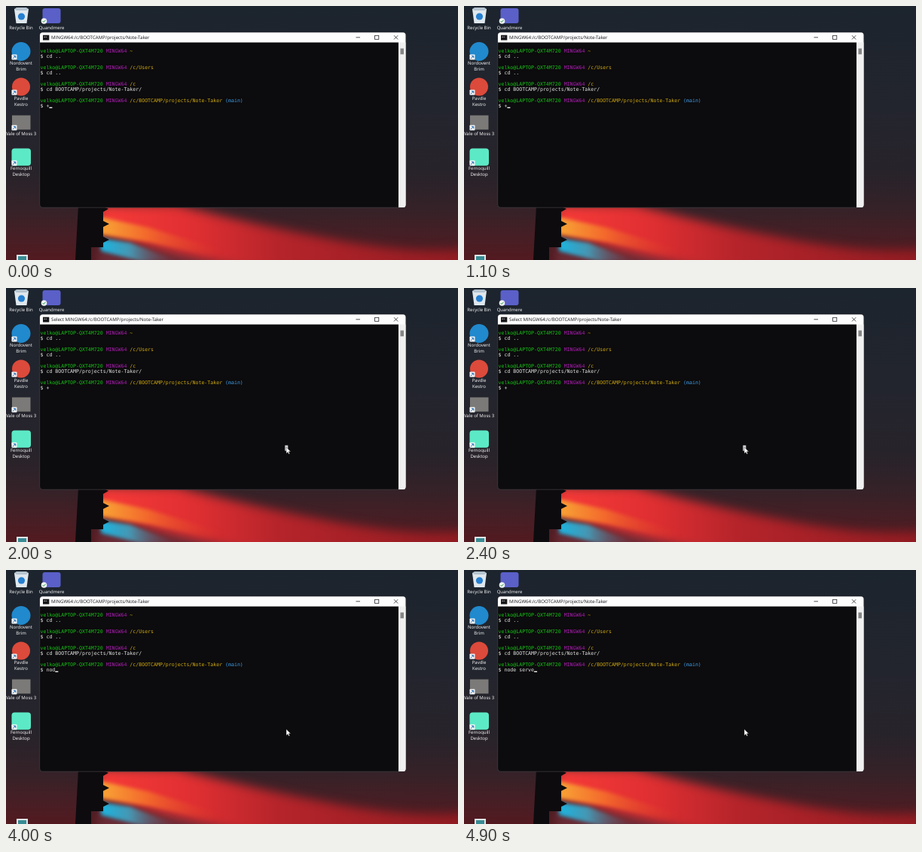
Animation, 600 px wide and 338 px high, one loop 5000 ms. Source, as an HTML page:

```html
<!DOCTYPE html>
<html lang="en">
<head>
<meta charset="utf-8">
<title>Terminal session</title>
<style>
html, body { margin: 0; width: 100%; height: 100%; overflow: hidden; background: #20252d; }
svg { display: block; width: 600px; height: 338px; }
text { text-rendering: geometricPrecision; white-space: pre; }
filter { color-interpolation-filters: sRGB; }
.label { font: 6px "Open Sans", sans-serif; fill: #fff; text-anchor: middle; }
.title { font: 6.17px "Open Sans", sans-serif; fill: #16161a; }
.term { font: 6.58px "DejaVu Sans Mono", monospace; fill: #e4e4e4; }
</style>
</head>
<body>
<svg viewBox="0 0 600 338" xmlns="http://www.w3.org/2000/svg">
  <defs>
    <linearGradient id="sky" x2="0" y2="1">
      <stop offset="0" stop-color="#1c242d"/>
      <stop offset=".4" stop-color="#23252e"/>
      <stop offset=".66" stop-color="#28232a"/>
      <stop offset=".8" stop-color="#352228"/>
      <stop offset=".9" stop-color="#451f25"/>
      <stop offset="1" stop-color="#521a20"/>
    </linearGradient>
    <linearGradient id="redBeam" gradientUnits="userSpaceOnUse" x1="130" x2="600">
      <stop offset="0" stop-color="#f53a38"/>
      <stop offset=".25" stop-color="#e02f32"/>
      <stop offset=".5" stop-color="#b4242a"/>
      <stop offset="1" stop-color="#921c22"/>
    </linearGradient>
    <linearGradient id="warmBeam" gradientUnits="userSpaceOnUse" x1="130" x2="290">
      <stop offset="0" stop-color="#f8a035"/>
      <stop offset=".35" stop-color="#f36a2c"/>
      <stop offset="1" stop-color="#d8302a" stop-opacity="0"/>
    </linearGradient>
    <linearGradient id="coolBeam" gradientUnits="userSpaceOnUse" x1="130" x2="230">
      <stop offset="0" stop-color="#1fb2dc"/>
      <stop offset=".35" stop-color="#4795b0"/>
      <stop offset="1" stop-color="#7a4450" stop-opacity="0"/>
    </linearGradient>
    <filter id="soft" x="-20%" y="-60%" width="140%" height="220%"><feGaussianBlur stdDeviation="7"/></filter>
    <filter id="haze" x="-20%" y="-40%" width="140%" height="180%"><feGaussianBlur stdDeviation="2.5"/></filter>
    <g id="shortcut">
      <rect width="7" height="7" rx=".8" fill="#f4f6f8"/>
      <path d="M1.5 5.6 5 2.1M2.4 1.9H5.2V4.7" fill="none" stroke="#2874b8"/>
    </g>
  </defs>

  <rect width="600" height="338" fill="url(#sky)"/>
  <g filter="url(#soft)">
    <path d="M122 264H225Q330 292 440 312T620 322V352H330Q210 326 122 300Z" fill="url(#redBeam)"/>
    <path d="M122 318 200 324 330 352H122Z" fill="#6a2c36"/>
  </g>
  <g filter="url(#haze)">
    <path d="M126 281 190 295 290 326 270 332 190 314 126 304Z" fill="url(#warmBeam)"/>
    <path d="M126 309 165 315 230 340H180L126 326Z" fill="url(#coolBeam)"/>
  </g>
  <path d="M96 266H128L136 270 129 274V286L137 290 129 294V307L137 311 129 315V321H113V338H92Z" fill="#0d0b0e"/>

  <g id="icons">
    <path d="M11 4H30L27.5 23H13.5Z" fill="#dfe7ed"/>
    <path d="M11 4 14 2H27L30 4 27 6H14Z" fill="#b5c4cf"/>
    <circle cx="20.5" cy="14" r="4.6" fill="#267fd0"/>
    <rect x="48.5" y="3" width="24" height="20" rx="3" fill="#5a60c8"/>
    <circle cx="50.5" cy="20" r="3.8" fill="#f4f7f4"/>
    <path d="M48.5 20 50 21.5 52.7 18.5" fill="none" stroke="#26964a"/>
    <circle cx="20" cy="60.5" r="12.5" fill="#2189cd"/>
    <circle cx="20" cy="107.5" r="12" fill="#dc4a3b"/>
    <rect x="8" y="145.5" width="24.5" height="19" fill="#7b7a78"/>
    <rect x="7.5" y="189.5" width="25.5" height="23" rx="4" fill="#5ceac6"/>
    <rect x="14" y="331" width="15" height="9" fill="#dfe6e8"/>
    <rect x="16" y="333" width="11" height="6" fill="#388c94"/>
  </g>
  <g id="labels"></g>

  <rect x="44.7" y="35.2" width="486" height="233" rx="4" fill="#0c0b0d" stroke="#4c4b50" stroke-width=".6"/>
  <path d="M45 48.5V39Q45 35.3 48.7 35.3H527Q530.5 35.3 530.5 39V264.5Q530.5 268 527 268H521V48.5Z" fill="#fdfdfe"/>
  <path d="M521 48.5H530.5V264.5Q530.5 268 527 268H521Z" fill="#f0f0f1"/>
  <rect x="523.5" y="56.5" width="4.5" height="7.8" fill="#858588"/>
  <rect x="49" y="38.7" width="8.3" height="6.8" fill="#17171a"/>
  <path d="M50.3 41.2H52.2M52.8 41.2H54.2" stroke="#ddd" stroke-width=".8"/>
  <g fill="none" stroke="#26262a" stroke-width=".8">
    <path d="M464.5 41.8H470M515 39.2 520.2 44.4M520.2 39.2 515 44.4"/>
    <rect x="489.6" y="39.3" width="5.2" height="5"/>
  </g>
  <text id="title" class="title" x="60" y="44.3"></text>
  <g id="screen"></g>
  <text id="input" class="term" x="45.5" y="135"></text>
  <rect id="caret" y="134.6" width="4" height="1.4" fill="#eee"/>
  <rect id="mark" x="370.3" y="209.4" width="4" height="7.3" fill="#d6d6d6"/>
  <path id="pointer" d="M372 211.7V220.2L374 218.4 375.3 221.1 376.7 220.5 375.4 217.8H378Z" fill="#fff" stroke="#111" stroke-width=".4"/>
</svg>
<script>
const NS = "http://www.w3.org/2000/svg";
const $ = id => document.getElementById(id);
const LOOP = 5000, STEP = 100, BLINK = 530;
const LEFT = 45.5, COL = 3.963, TOP = 61.7, ROW = 7.33;
const PATH = "/c/BOOTCAMP/projects/Note-Taker";
const COMMAND = "node serve";
const TYPE_START = 3735, TYPE_STEP = 128;
const WHITE = "#e4e4e4", GREEN = "#17c417", PURPLE = "#ae1cb4", YELLOW = "#d0ab10", BLUE = "#3f9fe8";

function add(parent, tag, attrs, content = "") {
  const el = document.createElementNS(NS, tag);
  for (const key in attrs) el.setAttribute(key, attrs[key]);
  el.textContent = content;
  return parent.appendChild(el);
}

const labels = [
  ["Recycle Bin", 20, 31], ["Quandmere", 60.5, 31],
  ["Nordovent", 20, 77.8], ["Brim", 20, 86.2],
  ["Pavdle", 20, 124.8], ["Kestro", 20, 132.6],
  ["Vale of Moss 3", 20, 171.6],
  ["Fernoquill", 20, 218], ["Desktop", 20, 226.3]
];
for (const [name, x, y] of labels) add($("labels"), "text", { class: "label", x, y }, name);
for (const y of [64.5, 111.5, 158.5, 205.5]) add($("icons"), "use", { href: "#shortcut", x: 7.5, y });

function line(row, parts) {
  const text = add($("screen"), "text", { class: "term", x: LEFT, y: TOP + row * ROW });
  for (const [content, fill] of parts) add(text, "tspan", { fill }, content);
}

function prompt(row, dir, branch = "") {
  line(row, [
    ["velko@LAPTOP-QXT4M720 ", GREEN], ["MINGW64 ", PURPLE],
    [dir, YELLOW], [branch, BLUE]
  ]);
}

prompt(0, "~");
line(1, [["$ cd ..", WHITE]]);
prompt(3, "/c/Users");
line(4, [["$ cd ..", WHITE]]);
prompt(6, "/c");
line(7, [["$ cd BOOTCAMP/projects/Note-Taker/", WHITE]]);
prompt(9, PATH, " (main)");

const show = (id, on) => $(id).setAttribute("visibility", on ? "visible" : "hidden");

function draw(now) {
  const t = Math.floor((now % LOOP) / STEP) * STEP;
  const selecting = t >= 1900 && t < 2500;
  const count = Math.max(0, Math.floor((t - TYPE_START) / TYPE_STEP) + 1);
  const typed = t < 2700 ? "+" : COMMAND.slice(0, count);
  const caretOn = count > 0 || t % (2 * BLINK) < BLINK;

  $("title").textContent = (selecting ? "Select " : "") + "MINGW64:" + PATH;
  $("input").textContent = "$ " + typed;
  $("caret").setAttribute("x", LEFT + (2 + typed.length) * COL);
  show("caret", caretOn && !selecting);
  show("mark", selecting);
  show("pointer", t >= 1200);
}

const start = performance.now();
function tick() {
  draw(performance.now() - start);
  requestAnimationFrame(tick);
}
tick();
</script>
</body>
</html>
```
